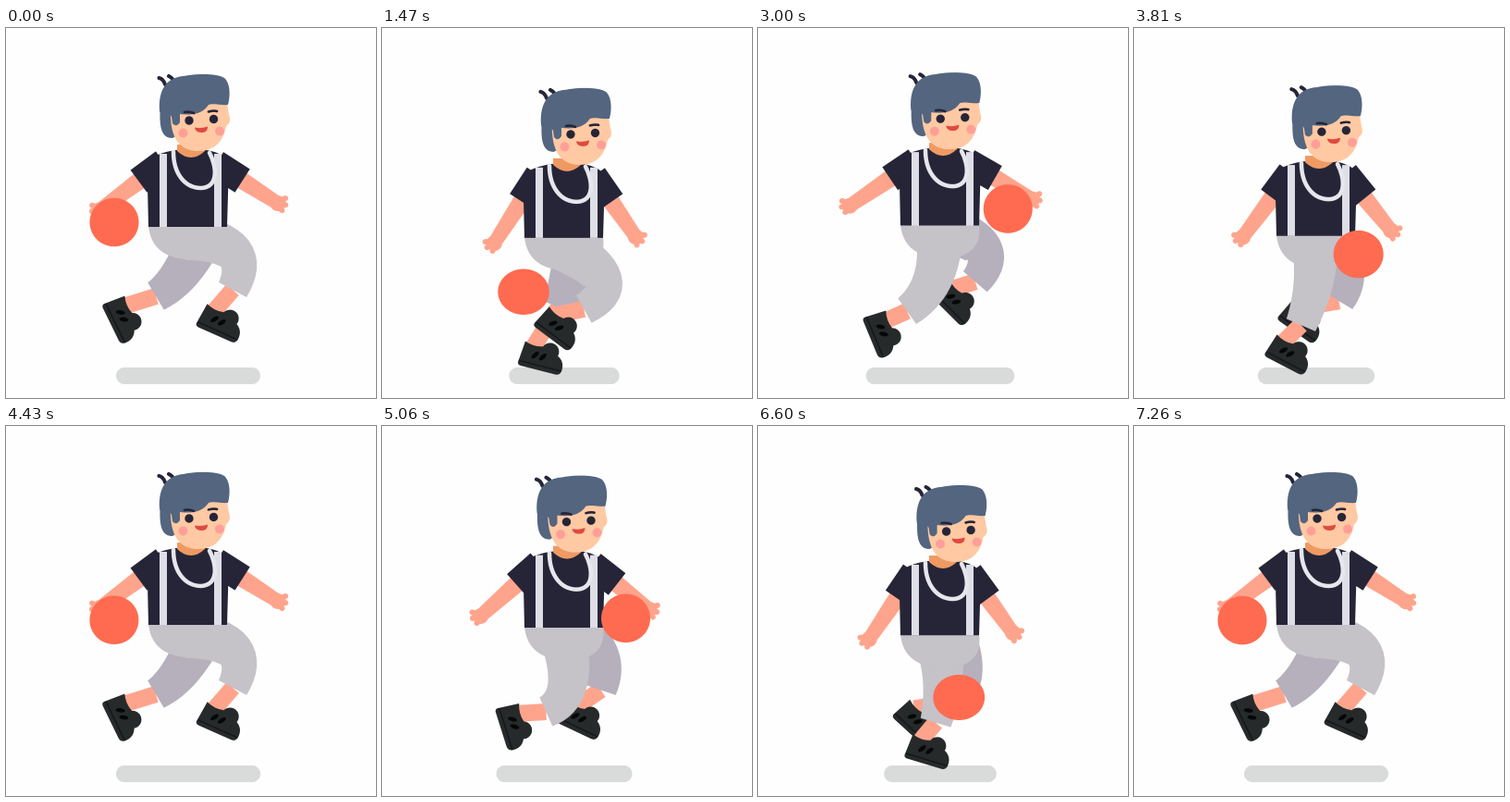
Recreate the animation shown at these times as an HTML page with a canvas. Size 400x400 px, loop 7.36 s.

```html
<!DOCTYPE html>
<html lang="en">
<head>
<meta charset="utf-8">
<title>Dribbling run</title>
<style>
  html, body { margin: 0; height: 100%; overflow: hidden; background: #fefefe; }
  canvas { display: block; width: 100vmin; height: 100vmin; }
</style>
</head>
<body>
<canvas></canvas>
<script>
const LOOP = 7360, START = 655, FIRST_STEP = 690, CYCLE = 943.6, RUNS = 7, UNITS = 24;
const SKIN = '#ffa48c', FACE = '#ffc9a3', HAIR = '#53657f', DARK = '#262538',
      CLOTH = '#c5c2c8', CLOTH_FAR = '#b5b0bc', LIGHT = '#dfdee6', BALL = '#ff6b50', SHOE = '#272a2b';

// Every row: phase in a cycle of 24, then values.
// Body drop.
const bodyKeys = [[0, 0], [2.2, -6], [4.1, 4], [6.4, 13.5], [8.3, 12], [11.7, -2],
                  [14.5, -6], [16.1, 4], [18.7, 14.5], [20.7, 15]];
// Ball x and signed height above the floor; the sign flips at each bounce.
const ballKeys = [[0, 117, 138], [2.3, 115, 155], [4.1, 127, 138], [6.3, 190, 0], [8.3, 243.5, -105],
                  [11.7, 270.5, -153], [14.5, 274, -158.5], [16.1, 262.5, -138], [18.8, 200, 0], [20.7, 153.5, 62]];
// Legs: knee x y, hem x y, heel x y, foot angle.
const nearKeys = [
  [0, 272, 232, 245, 283, 207, 322, 24], [4.1, 255, 252, 242, 288, 203, 325, 25],
  [6.3, 215, 275, 205, 316, 176, 355, 12], [8.3, 198, 280, 180, 321, 142, 354, 28],
  [11.7, 198, 280, 161, 306, 114, 315, 68], [14.5, 196, 280, 158, 305, 110, 306, 81],
  [16.1, 214, 293, 178, 309, 124, 308, 72], [20.7, 270, 275, 218, 304, 165, 322, 37]];
const farKeys = [
  [0, 192, 272, 162, 290, 105, 301, 64], [4.1, 208, 286, 174, 302, 120, 305, 72],
  [8.3, 240, 265, 222, 295, 157, 315, 35], [11.7, 266, 238, 235, 274, 189, 290, 45],
  [14.5, 268, 230, 242, 268, 197, 293, 36], [16.1, 248, 250, 236, 286, 190, 321, 25],
  [18.8, 212, 275, 205, 305, 178, 357, 10], [20.7, 202, 275, 191, 302, 149, 364, 14]];

const canvas = document.querySelector('canvas'), g = canvas.getContext('2d');
canvas.width = canvas.height = 800;

// Periodic cubic interpolation through the rows.
function sample(keys, p) {
  const n = keys.length;
  const at = i => {
    const turn = Math.floor(i / n), k = keys[i - turn * n];
    return [k[0] + turn * UNITS, ...k.slice(1)];
  };
  let i = n - 1;
  while (keys[i][0] > p) i--;
  const [a, b, c, d] = [at(i - 1), at(i), at(i + 1), at(i + 2)];
  const w = c[0] - b[0], u = (p - b[0]) / w, u2 = u * u, u3 = u2 * u;
  return b.slice(1).map((v, j) => {
    j++;
    const m0 = (c[j] - a[j]) / (c[0] - a[0]) * w, m1 = (d[j] - b[j]) / (d[0] - b[0]) * w;
    return (2 * u3 - 3 * u2 + 1) * v + (u3 - 2 * u2 + u) * m0 + (3 * u2 - 2 * u3) * c[j] + (u3 - u2) * m1;
  });
}

function fill(color, path) {
  g.fillStyle = color;
  g.fill(new Path2D(path));
}

function line(color, width, path, cap = 'round') {
  g.strokeStyle = color;
  g.lineWidth = width;
  g.lineCap = cap;
  g.stroke(new Path2D(path));
}

function oval(color, x, y, rx, ry = rx, turn = 0) {
  g.fillStyle = color;
  g.beginPath();
  g.ellipse(x, y, rx, ry, turn, 0, 7);
  g.fill();
}

function group(x, y, angle, draw) {
  g.save();
  g.translate(x, y);
  g.rotate(angle);
  draw();
  g.restore();
}

// Curved limb whose width runs from w0 to w1.
function limb(color, [ax, ay], [cx, cy], [ex, ey], w0, w1) {
  const left = [], right = [], steps = 16;
  for (let i = 0; i <= steps; i++) {
    const u = i / steps, v = 1 - u;
    const x = v * v * ax + 2 * u * v * cx + u * u * ex, y = v * v * ay + 2 * u * v * cy + u * u * ey;
    const dx = v * (cx - ax) + u * (ex - cx), dy = v * (cy - ay) + u * (ey - cy);
    const k = (w0 + (w1 - w0) * u) / 2 / (Math.hypot(dx, dy) || 1);
    left.push([x - dy * k, y + dx * k]);
    right.unshift([x + dy * k, y - dx * k]);
  }
  fill(color, 'M' + left.concat(right).join('L') + 'Z');
}

function shoe() {
  fill(SHOE, 'M0 -26Q10 -22 20 -25A9.5 9.5 0 0 1 38 -19Q46 -15 46 -6Q46 1 40 1H2Q-3 1 -2 -4Z');
  line('#15181a', 1.5, 'M-1 -4H45');
  oval('#060707', 14, -14, 2.3, 5, .6);
  oval('#060707', 22.5, -14, 2.3, 5, .6);
}

function leg(color, hip, [kx, ky, mx, my, fx, fy, deg]) {
  const a = deg * Math.PI / 180, cos = Math.cos(a), sin = Math.sin(a);
  const ankle = [fx + 10 * cos + 22 * sin, fy + 10 * sin - 22 * cos];
  line(SKIN, 18, `M${mx} ${my}L${ankle}`, 'butt');
  group(fx, fy, a, shoe);
  limb(color, hip, [kx, ky], [mx, my], 50, 34);
}

function arm(sx, sy, hx, hy, side) {
  const angle = Math.atan2(hy - sy, hx - sx);
  limb(SKIN, [sx, sy], [(sx + hx) / 2, (sy + hy) / 2], [hx, hy], 21, 15);
  group(hx, hy, angle, () => {
    oval(SKIN, 1, 0, 8.5);
    line(SKIN, 6, `M2 ${-4 * side}L5 ${-9 * side}M4 -2L9 -3M4 2L9 4`);
  });
  group(sx, sy, angle, () => {
    g.fillStyle = DARK;
    g.fillRect(-6, -15, 34, 30);
  });
}

function torso(h, b) {
  const low = 215 + b;
  fill(DARK, `M156 ${141 + h}Q168 ${134 + h} 184 ${132 + h}H217Q234 ${135 + h} 241 ${144 + h}L239 ${low}H154L153 ${170 + h}Z`);
  fill('#ef9a62', `M185 ${126 + h}H215V${133 + h}Q200 ${147 + h} 185 ${133 + h}Z`);
  line(LIGHT, 8, `M170 ${136 + h}V${low}M229 ${136 + h}V${low}`, 'butt');
  line('#e6e6ec', 4.5, `M181 ${134 + h}C181 ${157 + h} 193 ${173 + h} 211 ${173 + h}C230 ${172 + h} 228 ${150 + h} 220 ${135 + h}`);
}

function head() {
  line(DARK, 4, 'M165.5 54Q170 55 172 61M176 52Q180 54 182 58');
  fill(HAIR, 'M167 82C165 108 168 119 180 119L195 110V70Z');
  fill(FACE, 'M178 85C176 122 190 133 208 133C225 133 235 123 238 106Q244 102 241 94L238 75H180Z');
  fill(HAIR, 'M166 90C164 63 177 53 192 52C206 49 229 49 236 54C242 59 243 72 240 83C232 84 226 81 219 83C213 92 203 95 188 93V102Q184 108 180 103L179 96C176 91 172 89 167 93Z');
  line(DARK, 2.6, 'M193 91Q198 90 203 92M219 90.5Q224 89 228 90');
  oval(DARK, 198, 100, 4.7);
  oval(DARK, 224.5, 98.5, 4.7);
  oval('#ff9f98', 191.5, 113.5, 5);
  oval('#ff9f98', 231, 111.5, 5);
  fill('#df4a40', 'M204 107.5Q211 109 218 106.5Q218 113 211.5 113Q205 113 204 107.5Z');
}

function draw(p) {
  const [h] = sample(bodyKeys, p), b = .8 * h;
  const [bx, lift] = sample(ballKeys, p), by = 348 - Math.abs(lift);
  const squash = Math.max(0, 1 - Math.abs(lift) / 130) * 3;

  g.setTransform(2, 0, 0, 2, 0, 0);
  g.fillStyle = '#fefefe';
  g.fillRect(0, 0, 400, 400);

  const half = 78 - 1.23 * h - 9;
  line('#d9dada', 18, `M${197 - half} 376H${197 + half}`);

  leg(CLOTH_FAR, [212, 222 + b], sample(farKeys, p));
  leg(CLOTH, [196, 226 + b], sample(nearKeys, p));
  group(0, b, 0, () => fill(CLOTH, 'M154 214H239Q243 244 212 250Q158 254 154 214Z'));

  arm(166, 149 + h, 102.5 + 1.3 * h, 196 + 2.4 * h, -1);
  arm(232, 150 + h, 293 - 1.3 * h, 189 + 2.4 * h, 1);
  torso(h, b);
  group(.4 * h, h, 0, head);
  oval(BALL, bx, by, 26.5 + squash * .8, 26.3 - squash);
}

let origin;
function frame(now) {
  origin ??= now;
  const t = (now - origin) % LOOP;
  const turns = t < FIRST_STEP ? 0 : Math.min((t - START) / CYCLE, RUNS);
  draw(turns % 1 * UNITS);
  requestAnimationFrame(frame);
}
requestAnimationFrame(frame);
</script>
</body>
</html>
```
